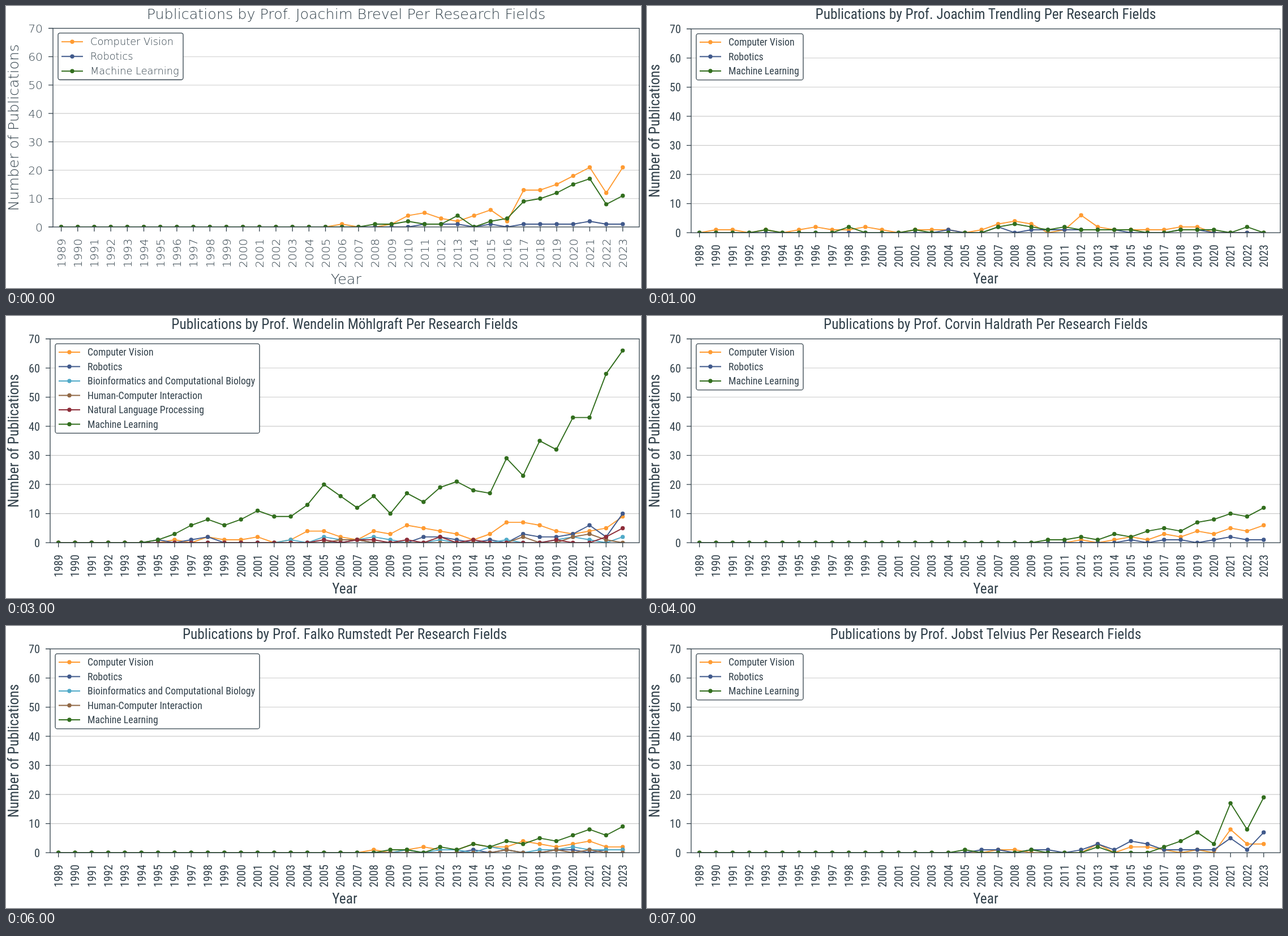
An HTML page for the animation above (8000 ms loop, 1122 by 499 pixels).

```html
<!DOCTYPE html>
<html lang="en">
<head>
<meta charset="utf-8">
<title>Publications per research field</title>
<style>
  html, body { margin: 0; width: 100%; height: 100%; overflow: hidden; background: #fff; }
  svg { display: block; width: 1122px; height: 499px; }
  text { fill: #32414b; }
  .thin { font-family: 'DejaVu Sans Light', 'DejaVu Sans', sans-serif; font-weight: 200; }
  .narrow { font-family: 'Roboto Condensed', Roboto, sans-serif; font-stretch: 75%; }
  .big { font-size: 25.4px; }
  .tick { font-size: 20.3px; }
  .key { font-size: 17.8px; }
  .mid { text-anchor: middle; }
  .end { text-anchor: end; }
  .axis { fill: none; stroke: #32414b; stroke-width: 1.3; }
  .grid { stroke: #ccc; stroke-width: 1.1; }
  .data { fill: none; stroke-width: 1.9; stroke-linejoin: round; }
</style>
</head>
<body>
<svg id="stage" viewBox="0 0 1122 499"></svg>
<script>
const FIRST = 1989, YEARS = 35, HOLD = 1000;

const FIELDS = {
  cv: ['Computer Vision', '#ff9b32'],
  rob: ['Robotics', '#415a8c'],
  bio: ['Bioinformatics and Computational Biology', '#50aac8'],
  hci: ['Human-Computer Interaction', '#916946'],
  vis: ['Visualization', '#0069aa'],
  nlp: ['Natural Language Processing', '#8d2d39'],
  ml: ['Machine Learning', '#326e1e']
};

const THIN = {
  font: 'thin', left: 83, right: 1119, top: 39.5, bottom: 391,
  titleY: 22.5, yLabelX: 21.7, xLabelY: 491.5, yTickX: 65, xTickY: 437.5,
  key: { x: 92, y: 47.8, row: 63.2, step: 26, text: 149, right: 313 }
};
const NARROW = {
  font: 'narrow', left: 78, right: 1119, top: 40.5, bottom: 401.2,
  titleY: 23, yLabelX: 22, xLabelY: 490.5, yTickX: 60, xTickY: 442.3,
  key: { x: 87, y: 49.2, row: 64, step: 25.5, text: 144, right: 276 }
};

// Yearly counts from the given year on; years left out are zero.
const line = (field, start, ...counts) => ({
  field,
  values: Array.from({ length: YEARS }, (_, i) => counts[i + FIRST - start] || 0)
});

const slides = [
  { who: 'Joachim Brevel', look: THIN, lines: [
    line('cv', 2006, 1, 0, 0, 1, 4, 5, 3, 2, 4, 6, 2, 13, 13, 15, 18, 21, 12, 21),
    line('rob', 2011, 1, 1, 1, 0, 1, 0, 1, 1, 1, 1, 2, 1, 1),
    line('ml', 2008, 1, 1, 2, 1, 1, 4, 0, 2, 3, 9, 10, 12, 15, 17, 8, 11)
  ] },
  { who: 'Joachim Trendling', look: NARROW, lines: [
    line('cv', 1990, 1, 1, 0, 1, 0, 1, 2, 1, 1, 2, 1, 0, 1, 1, 1, 0, 1, 3, 4, 3, 0, 1, 6, 2, 1, 1, 1, 1, 2, 2),
    line('rob', 2004, 1, 0, 0, 2, 0, 1, 1, 1, 1, 1, 1, 0, 0, 0, 1, 1),
    line('ml', 1993, 1, 0, 0, 0, 0, 2, 0, 0, 0, 1, 0, 0, 0, 0, 2, 3, 2, 1, 2, 1, 1, 1, 1, 0, 0, 1, 1, 1, 0, 2)
  ] },
  { who: 'Joachim Vorl', look: NARROW, lines: [
    line('cv', 1995, 1, 0, 0, 3, 2, 2, 1, 0, 1, 3, 3, 2, 1, 2, 2, 3, 2, 5, 7, 11, 6, 3, 5, 2, 10, 5, 12, 6, 8),
    line('rob', 1995, 2, 0, 0, 4, 5, 2, 5, 1, 3, 5, 6, 5, 7, 7, 9, 8, 7, 6, 3, 11, 3, 5, 4, 3, 8, 2, 3, 4, 5),
    line('bio', 1996, 2, 0, 0, 0, 1, 0, 1, 0, 5, 4, 3, 4, 2, 1, 1, 3, 1, 2, 3, 1),
    line('hci', 2004, 1, 0, 0, 0, 0, 1, 1, 2, 0, 0, 1, 0, 0, 0, 0, 1, 1, 0, 2, 1),
    line('vis', 2007, 1, 1, 1, 2, 2, 4, 1, 1, 0, 0, 0, 1),
    line('ml', 1989, 2, 0, 3, 0, 2, 0, 1, 2, 1, 1, 1, 3, 1, 5, 6, 12, 11, 7, 12, 9, 10, 15, 11, 5, 8, 6, 8, 8, 2, 5, 7, 5, 13, 7, 8)
  ] },
  { who: 'Wendelin Möhlgraft', look: NARROW, lines: [
    line('cv', 1996, 1, 0, 2, 1, 1, 2, 0, 1, 4, 4, 2, 1, 4, 3, 6, 5, 4, 3, 1, 3, 7, 7, 6, 4, 3, 4, 5, 9),
    line('rob', 1995, 1, 0, 1, 2, 0, 0, 0, 0, 0, 0, 0, 0, 1, 0, 0, 0, 2, 2, 1, 0, 1, 0, 3, 2, 2, 3, 6, 2, 10),
    line('bio', 2003, 1, 0, 2, 1, 1, 2, 1, 0, 0, 1, 0, 0, 0, 1, 0, 0, 1, 2, 1, 0, 2),
    line('hci', 2006, 1, 1, 0, 0, 0, 0, 0, 0, 0, 0, 0, 2, 0, 0, 2, 3, 1),
    line('nlp', 2005, 1, 0, 1, 1, 0, 1, 0, 2, 0, 1, 0, 0, 0, 0, 1, 0, 0, 2, 5),
    line('ml', 1995, 1, 3, 6, 8, 6, 8, 11, 9, 9, 13, 20, 16, 12, 16, 10, 17, 14, 19, 21, 18, 17, 29, 23, 35, 32, 43, 43, 58, 66)
  ] },
  { who: 'Corvin Haldrath', look: NARROW, lines: [
    line('cv', 2012, 1, 0, 1, 2, 1, 3, 2, 4, 3, 5, 4, 6),
    line('rob', 2015, 1, 0, 1, 1, 0, 1, 2, 1, 1),
    line('ml', 2010, 1, 1, 2, 1, 3, 2, 4, 5, 4, 7, 8, 10, 9, 12)
  ] },
  { who: 'Miranjeta Dolneci', look: NARROW, lines: [
    line('cv', 2011, 2, 0, 0, 3, 2, 5, 4, 4, 7, 3, 6, 7, 3),
    line('rob', 2014, 2, 0, 0, 4, 3, 2, 4, 1, 5, 3),
    line('hci', 2012, 1, 1, 2, 2, 9, 9, 15, 4, 8, 16, 11, 10),
    line('ml', 2012, 1, 1, 2, 3, 3, 2, 8, 5, 15, 6, 8, 16)
  ] },
  { who: 'Falko Rumstedt', look: NARROW, lines: [
    line('cv', 2008, 1, 0, 1, 2, 1, 1, 3, 2, 2, 4, 3, 2, 3, 4, 2, 2),
    line('rob', 2014, 1, 0, 1, 0, 0, 1, 1, 0, 1, 1),
    line('bio', 2010, 1, 0, 1, 1, 0, 2, 1, 0, 1, 1, 2, 1, 1, 1),
    line('hci', 2016, 1, 0, 0, 1, 0, 1),
    line('ml', 2009, 1, 1, 0, 2, 1, 3, 2, 4, 3, 5, 4, 6, 8, 6, 9)
  ] },
  { who: 'Jobst Telvius', look: NARROW, lines: [
    line('cv', 2007, 1, 1, 0, 0, 0, 0, 3, 0, 2, 2, 1, 0, 1, 0, 8, 3, 3),
    line('rob', 2006, 1, 1, 0, 1, 1, 0, 1, 3, 1, 4, 3, 1, 1, 1, 1, 5, 1, 7),
    line('ml', 2005, 1, 0, 0, 0, 1, 0, 0, 0, 2, 0, 0, 0, 2, 4, 7, 3, 17, 8, 19)
  ] }
];

const stage = document.getElementById('stage');

function add(parent, tag, attrs, text) {
  const el = document.createElementNS('http://www.w3.org/2000/svg', tag);
  for (const k in attrs) el.setAttribute(k, attrs[k]);
  if (text !== undefined) el.textContent = text;
  parent.append(el);
  return el;
}

function label(g, cls, x, y, text, turned) {
  const attrs = { class: cls, x, y };
  if (turned) attrs.transform = `rotate(-90 ${x} ${y})`;
  add(g, 'text', attrs, text);
}

const dot = (g, cx, cy, fill) => add(g, 'circle', { cx, cy, r: 3.7, fill });

function drawKey(g, { key, font }, lines) {
  const has = f => lines.some(l => l.field === f);
  const right = has('bio') ? 448 : has('hci') ? 355 : key.right;
  add(g, 'rect', {
    class: 'axis', x: key.x, y: key.y, width: right - key.x,
    height: 30.7 + key.step * (lines.length - 1), rx: 3.5, style: 'fill:#fff'
  });
  lines.forEach(({ field }, i) => {
    const [name, color] = FIELDS[field];
    const y = key.row + i * key.step;
    add(g, 'path', { class: 'data', stroke: color, d: `M${key.x + 6} ${y}h38` });
    dot(g, key.x + 25, y, color);
    label(g, 'key', key.text, y + (font === 'thin' ? 6 : 6.2), name);
  });
}

function drawSlide({ who, look, lines }, n) {
  const { left, right, top, bottom } = look;
  const w = right - left, h = bottom - top;
  const px = i => left + (i + 0.5) * w / (YEARS + 0.5);
  const py = v => bottom - v * h / 70;
  const midX = left + w / 2, midY = top + h / 2;
  const g = add(stage, 'g', { class: look.font, display: 'none' });

  const clip = add(g, 'clipPath', { id: 'plot' + n });
  add(clip, 'rect', { x: left, y: top, width: w, height: h });

  let ticks = '';
  for (let v = 0; v <= 70; v += 10) {
    const y = py(v);
    if (v > 0 && v < 70) add(g, 'path', { class: 'grid', d: `M${left} ${y}H${right}` });
    ticks += `M${left - 8} ${y}h8`;
    label(g, 'tick end', look.yTickX, y + 7.5, v);
  }
  for (let i = 0; i < YEARS; i++) {
    ticks += `M${px(i)} ${bottom}v8`;
    label(g, 'tick mid', px(i) + 7.3, look.xTickY, FIRST + i, true);
  }

  const plot = add(g, 'g', { 'clip-path': `url(#plot${n})` });
  for (const { field, values } of lines) {
    const color = FIELDS[field][1];
    const points = values.map((v, i) => px(i) + ',' + py(v)).join(' ');
    add(plot, 'polyline', { class: 'data', stroke: color, points });
    values.forEach((v, i) => dot(plot, px(i), py(v), color));
  }

  add(g, 'path', { class: 'axis', d: ticks });
  add(g, 'rect', { class: 'axis', x: left, y: top, width: w, height: h });
  drawKey(g, look, lines);

  label(g, 'big mid', midX, look.titleY, `Publications by Prof. ${who} Per Research Fields`);
  label(g, 'big mid', midX, look.xLabelY, 'Year');
  label(g, 'big mid', look.yLabelX, midY, 'Number of Publications', true);
  return g;
}

const groups = slides.map(drawSlide);
const began = performance.now();
let shown = -1;

function show(n) {
  if (n === shown) return;
  groups.forEach((g, i) => g.setAttribute('display', i === n ? 'inline' : 'none'));
  shown = n;
}

function tick() {
  show(Math.floor((performance.now() - began) / HOLD) % groups.length);
  requestAnimationFrame(tick);
}
show(0);
tick();
</script>
</body>
</html>
```
